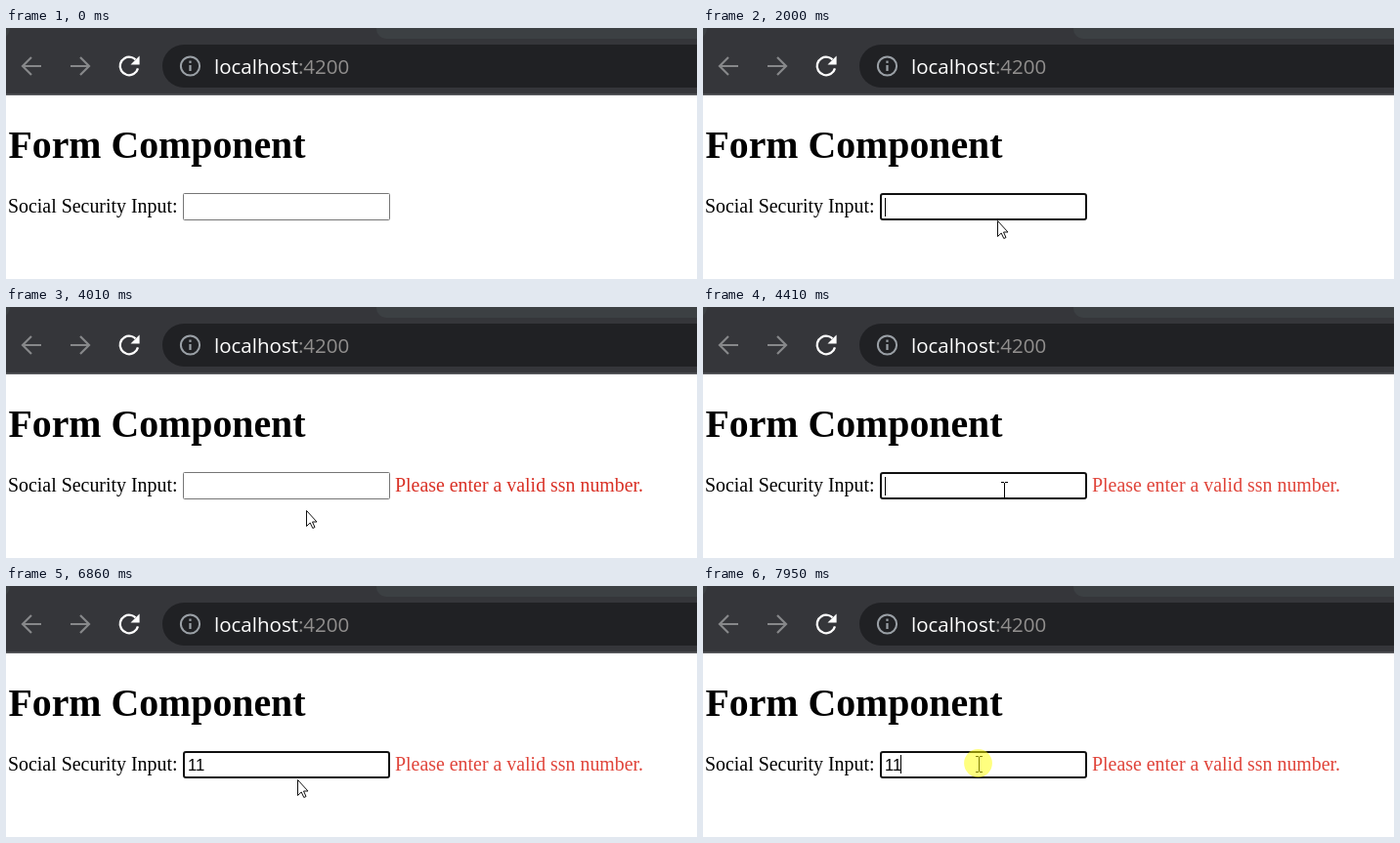
An HTML page with a canvas that plays this animation: 707 by 257 pixels, repeating every 8 s.

```html
<!DOCTYPE html>
<html lang="en">
<head>
<meta charset="utf-8">
<title>Form Component</title>
<style>
  html, body { margin: 0; width: 100%; height: 100%; overflow: hidden; background: #fff; }
  canvas { display: block; width: 707px; height: 257px; }
</style>
</head>
<body>
<canvas id="stage" width="707" height="257"></canvas>
<script>
const LOOP = 8000, BLINK = 530, STEP = 1000 / 15;
const ENTER = 730, INPUT_BOTTOM = 197, BASELINE = 189;
const ctx = document.getElementById('stage').getContext('2d');

const SERIF = '"Liberation Serif", "Times New Roman", serif';
const SANS = '"Liberation Sans", Arial, sans-serif';
const UI = '"Open Sans", "Segoe UI", sans-serif';
const ARROW = new Path2D('M.5 .5V16.5L4.2 13L6.8 18.5L9 17.5L6.5 12H11z');

// Each move starts where the last one ended
const HOME = { x: 309, y: 250 };
const MOVES = [
  { start: 665, end: 1000, x: 294, y: 178 },
  { start: 1795, end: 2270, x: 307, y: 215 },
  { start: 3945, end: 4210, x: 308, y: 187 },
  { start: 6655, end: 7000, x: 289, y: 208 },
  { start: 7615, end: 7930, x: 282, y: 182 }
];
const CLICKS = [
  { start: 1620, end: 1670 },
  { start: 3020, end: 3150 },
  { start: 4340, end: 4410 },
  { start: 7270, end: 7340 },
  { start: 7950, end: 8000 }
];
const KEYS = [5670, 5930];

const ease = p => 1 - (1 - p) ** 1.3;

// The pointer is redrawn fifteen times a second
function pointerAt(t) {
  const now = Math.floor((t + 4) / STEP) * STEP;
  let { x, y } = HOME;
  for (const move of MOVES) {
    const p = (now - move.start) / (move.end - move.start);
    const k = ease(Math.min(1, Math.max(0, p)));
    x += (move.x - x) * k;
    y += (move.y - y) * k;
  }
  return { x: Math.round(x), y: Math.round(y) };
}

const overInput = point => point.y < INPUT_BOTTOM;

function text(str, x, y, font, color) {
  ctx.font = font;
  ctx.fillStyle = color;
  ctx.fillText(str, x, y);
}

function rect(x, y, w, h, color) {
  ctx.fillStyle = color;
  ctx.fillRect(x, y, w, h);
}

function roundRect(x, y, w, h, r) {
  ctx.beginPath();
  ctx.roundRect(x, y, w, h, r);
}

function stroke(color, width) {
  ctx.strokeStyle = color;
  ctx.lineWidth = width;
  ctx.stroke();
}

function drawNavArrow(x, dir) {
  const tip = x - 9 * dir;
  ctx.beginPath();
  ctx.moveTo(x + 10 * dir, 39);
  ctx.lineTo(tip, 39);
  ctx.moveTo(x, 30);
  ctx.lineTo(tip, 39);
  ctx.lineTo(x, 48);
  stroke('#87888a', 2.2);
}

function drawReload(x, y) {
  ctx.beginPath();
  ctx.arc(x, y, 9.3, 0.26, -0.8);
  stroke('#fff', 2.3);
  ctx.beginPath();
  ctx.moveTo(x + 10.6, y - 10.6);
  ctx.lineTo(x + 10.6, y - 1.5);
  ctx.lineTo(x + 1.5, y - 1.5);
  ctx.fillStyle = '#fff';
  ctx.fill();
}

function drawInfo(x, y) {
  ctx.beginPath();
  ctx.arc(x, y, 9.6, 0, Math.PI * 2);
  stroke('#9aa0a6', 2);
  rect(x - 1.1, y - 1, 2.2, 6, '#9aa0a6');
  rect(x - 1.1, y - 5.4, 2.2, 2.3, '#9aa0a6');
}

function drawBrowser() {
  rect(0, 0, 707, 69, '#35363a');
  ctx.fillStyle = '#3c4043';
  roundRect(379, -12, 340, 23, 10);
  ctx.fill();
  ctx.beginPath();
  ctx.moveTo(0, 0);
  ctx.lineTo(4, 0);
  ctx.quadraticCurveTo(3.5, 6, 0, 9);
  ctx.fill();
  rect(0, 67.5, 707, 1.5, '#5a5b5f');

  drawNavArrow(26, 1);
  drawNavArrow(76, -1);
  drawReload(126, 39);

  ctx.fillStyle = '#202124';
  roundRect(160, 17, 600, 44, 22);
  ctx.fill();
  drawInfo(188.5, 39);

  const font = '20.5px ' + UI;
  text('localhost', 213, 47, font, '#fff');
  text(':4200', 213 + ctx.measureText('localhost').width, 47, font, '#918f8e');
}

function drawInput(focused, hover) {
  if (focused) {
    roundRect(182, 170, 210, 26, 2);
    stroke('#101010', 2);
  } else {
    roundRect(181.5, 169.5, 211, 27, 1);
    stroke(hover ? '#444' : '#767676', 1);
  }
}

function drawBeam(x, y) {
  rect(x, y - 7, 1, 15, '#000');
  for (const end of [y - 8, y + 8]) {
    rect(x - 3, end, 3, 1, '#000');
    rect(x + 1, end, 3, 1, '#000');
  }
}

function drawArrow(x, y) {
  ctx.save();
  ctx.translate(x, y);
  ctx.fillStyle = '#fff';
  ctx.fill(ARROW);
  ctx.strokeStyle = '#111';
  ctx.lineWidth = 1;
  ctx.stroke(ARROW);
  ctx.restore();
}

function drawCaret(t, since, count) {
  if (Math.floor(Math.max(0, t - since) / BLINK) % 2) return;
  rect(186 + 8 * count, count ? 173 : 174, 1, 19, '#000');
}

function draw(t) {
  const pointer = pointerAt(t);
  const hover = t >= ENTER && overInput(pointer);
  const clicks = CLICKS.filter(c => t >= c.start);
  const last = clicks[clicks.length - 1];
  const focused = last && overInput(pointerAt(last.start));
  const touched = clicks.length > 1;
  const typed = KEYS.filter(k => t >= k);

  rect(0, 0, 707, 257, '#fff');
  drawBrowser();
  text('Form Component', 2.5, 133, 'bold 39.8px ' + SERIF, '#000');
  text('Social Security Input:', 2, BASELINE, '19.9px ' + SERIF, '#000');
  drawInput(focused, hover);
  if (touched) {
    text('Please enter a valid ssn number.', 398, BASELINE, '19.9px ' + SERIF, focused ? '#e0443a' : '#d93025');
  }
  text('1'.repeat(typed.length), 186, BASELINE, '16.67px ' + SANS, '#000');
  if (focused) drawCaret(t, Math.max(last.start + 30, ...typed), typed.length);

  if (t >= ENTER) (hover ? drawBeam : drawArrow)(pointer.x, pointer.y);
  if (last && t < last.end) {
    ctx.beginPath();
    ctx.arc(pointer.x - 0.5, pointer.y - 0.5, 14.4, 0, Math.PI * 2);
    ctx.fillStyle = 'rgba(255, 255, 0, 0.5)';
    ctx.fill();
  }
}

const origin = performance.now();
function tick() {
  draw((performance.now() - origin) % LOOP);
  requestAnimationFrame(tick);
}
tick();
</script>
</body>
</html>
```
